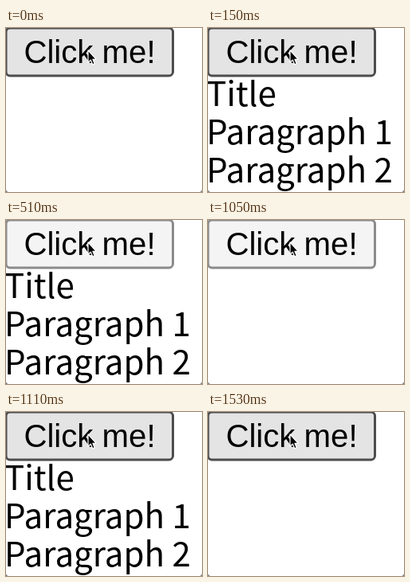
These frames come from a looping animation (246x206 px, 1.83 s). An HTML page:

```html
<!DOCTYPE html>
<html lang="en">
<head>
<meta charset="utf-8">
<title>Toggle button</title>
<style>
  html, body { margin: 0; width: 100%; height: 100%; overflow: hidden; background: #fff; }
  svg { display: block; width: 246px; height: 206px; }
  .label { font: 40.2px "Liberation Sans", Arial, sans-serif; }
  .copy { font: 42px "Noto Sans CJK KR", "Noto Sans CJK JP", "Noto Sans CJK SC", sans-serif; }
</style>
</head>
<body>
<svg viewBox="0 0 246 206">
  <rect width="246" height="206" fill="#fff"/>
  <path d="M0 203Q.3 205.7 3 206H0ZM246 203Q245.7 205.7 243 206H246Z" fill="#777"/>
  <rect id="button" x="0" y="0" width="209.5" height="60" rx="5" stroke-width="3"/>
  <text class="label" x="22.4" y="43.6">Click me!</text>
  <g id="copy" class="copy">
    <text x="-2" y="98">Title</text>
    <text x="-2" y="146">Paragraph 1</text>
    <text x="-2" y="194">Paragraph 2</text>
  </g>
  <path d="M103 28V43.2L106.3 40.2L108.7 45.8L111.2 44.7L108.9 39.3H113.2Z"
        fill="#000" stroke="#fff" stroke-width="1.2" stroke-linejoin="round"/>
</svg>
<script>
  const LOOP = 1830;
  const PRESSES = [[60, 150], [510, 570], [1050, 1110], [1470, 1530]];
  const button = document.getElementById("button");
  const copy = document.getElementById("copy");

  function draw(t) {
    const pressed = PRESSES.some(([down, up]) => t >= down && t < up);
    const clicks = PRESSES.filter(([, up]) => t >= up).length;
    button.setAttribute("fill", pressed ? "#f4f4f4" : "#e4e4e4");
    button.setAttribute("stroke", pressed ? "#8b8b8b" : "#4d4d4d");
    copy.setAttribute("visibility", clicks % 2 ? "visible" : "hidden");
  }

  function tick() {
    draw(performance.now() % LOOP);
    requestAnimationFrame(tick);
  }

  tick();
</script>
</body>
</html>
```
